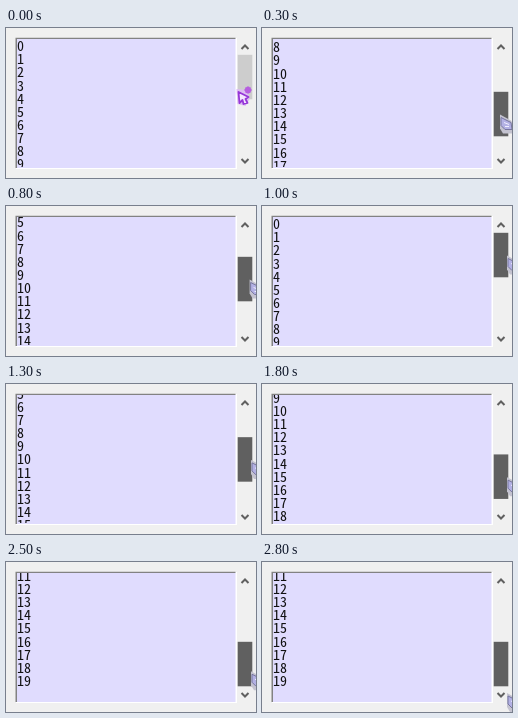
Recreate the animation shown at these times as an HTML page. Size 250 by 150 pixels, loop 3000 ms.

```html
<!DOCTYPE html>
<html lang="en">
<head>
<meta charset="utf-8">
<title>Dragging a scrollbar</title>
<style>
  html, body { margin: 0; width: 100%; height: 100%; overflow: hidden; background: #f0f0f0; }
  svg { display: block; width: 100vw; height: 100vh; }
  text { font: 14px "Noto Sans Mono CJK JP", "Noto Sans CJK JP", monospace; fill: #111; }
  .arrow { fill: none; stroke: #606060; stroke-width: 2; }
</style>
</head>
<body>
<svg viewBox="0 0 250 150">
  <clipPath id="view"><rect x="11" y="11" width="218" height="128"/></clipPath>
  <path fill="#fff" d="M10 10h221v131H10z"/>
  <path fill="#828282" d="M9.500 9.800h220v1.200H11v129H9.500z"/>
  <path fill="#e0dcfe" d="M11 11h218.500v129H11z"/>
  <g clip-path="url(#view)"><g id="lines"></g></g>
  <path fill="#f0f0f0" d="M231 10h16v130h-16z"/>
  <path class="arrow" d="M235.500 21l3.500-3.500 3.500 3.500M235.500 131l3.500 3.500 3.500-3.500"/>
  <rect id="thumb" x="231.700" width="14.600" height="44.500"/>
  <g id="pointer">
    <path fill="#dcbdf2" d="M-8-7l11 1 2 9-4 7-8-2z"/>
    <path fill="#f4e6ff" stroke="#9636d8" stroke-width="1.800" stroke-linejoin="round" d="M-6-4L4 1 1 3l2 4-4 1-1-4-3 3z"/>
    <path stroke="#b65ee0" stroke-width="2" d="M0-6h7M3.500-9.500v7M1-8.500l5 5M6-8.500l-5 5"/>
  </g>
  <g id="grip">
    <path fill="#c4c3d0" d="M-5-9l11 6 3 5-1 8H-2l-3-5z"/>
    <path fill="#b3b1e4" stroke="#77769e" d="M-4-6l10 5 1 7H0l-4-4z"/>
    <path stroke="#f0eeff" d="M-1-1l5 2M0 3h4"/>
  </g>
</svg>
<script>
const LOOP = 3000, STEP = 100, LAST = 2800;
const TOP = 26.8, TRAVEL = 53, GRAB = 31.7, MAX_SCROLL = 148.9, LINE = 13.15;
// Turning points of the hand: time, x, y
const path = [
  [0, 238.5, 68], [100, 240, 63], [500, 246, 128], [1000, 250, 58.5],
  [1650, 250, 118.5], [2100, 250, 53], [2700, 250, 140], [LAST, 250, 140]
];
const $ = id => document.getElementById(id);
const clamp = (v, lo, hi) => Math.min(hi, Math.max(lo, v));

$('lines').innerHTML = Array.from({ length: 20 }, (_, i) =>
  `<text x="11" y="${23.1 + i * LINE}">${i}</text>`).join('');

function handAt(t) {
  const i = Math.max(1, path.findIndex(p => p[0] >= t));
  const [t0, x0, y0] = path[i - 1], [t1, x1, y1] = path[i];
  const k = (1 - Math.cos(Math.PI * (t - t0) / (t1 - t0))) / 2;
  return [x0 + (x1 - x0) * k, y0 + (y1 - y0) * k];
}

function draw(now) {
  const t = Math.min(LAST, Math.floor(now % LOOP / STEP) * STEP);
  const [x, y] = handAt(t);
  const dragging = t > 0;
  const shift = dragging ? clamp(y - GRAB - TOP, 0, TRAVEL) : 0;
  $('lines').setAttribute('transform', `translate(0 ${-shift / TRAVEL * MAX_SCROLL})`);
  $('thumb').setAttribute('y', TOP + shift);
  $('thumb').setAttribute('fill', dragging ? '#606060' : '#cdcdcd');
  for (const id of ['pointer', 'grip']) {
    $(id).setAttribute('transform', `translate(${x} ${y})`);
    $(id).style.display = (id === 'grip') === dragging ? '' : 'none';
  }
  requestAnimationFrame(draw);
}
requestAnimationFrame(draw);
</script>
</body>
</html>
```
